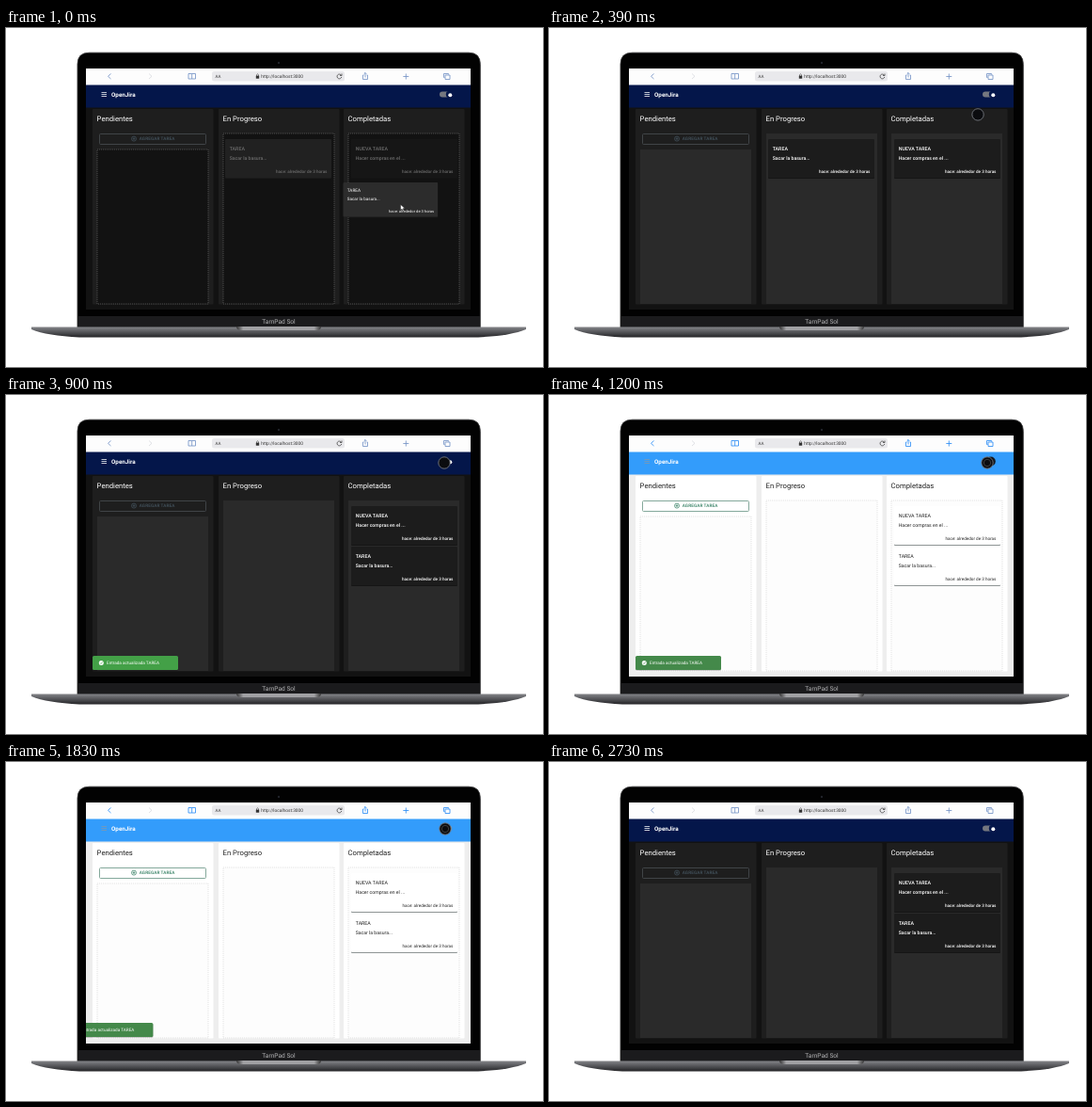
Recreate the animation shown at these times as an HTML page. Size 571x360 px, loop 3.66 s.

```html
<!DOCTYPE html>
<html lang="es">
<head>
<meta charset="utf-8">
<title>Tablero de tareas</title>
<style>
html, body { margin: 0; height: 100%; overflow: hidden; background: #fff; }
svg { display: block; width: 100vw; height: 100vh; font-family: Roboto, sans-serif; text-rendering: geometricPrecision; }
#screen { --page: #121212; --paper: #1e1e1e; --list: #2a2a2a; --line: none; --card: #1c1c1c; --edge: #151515;
  --ink: #fff; --bar: #04164a; --icon: #7090c4; --btn: #455560; --btnLine: #45494c; --pill: #74777f; --ok: #43a047; }
#screen.light { --page: #eee; --paper: #fff; --list: #fdfdfd; --line: #d5d5d5; --card: #fff; --edge: #8e9595;
  --ink: #222; --bar: #339cfb; --icon: #2589f5; --btn: #2d7c5e; --btnLine: #769f90; --pill: #9aabb8; --ok: #44894a; }
#screen.drag { --list: #121212; --line: #686868; --card: #212121; --edge: #1a1a1a; }
.drag #shopping { --card: #161616; --edge: #141414; }
.drag .lists .card text { fill: #6c6c6c; }
.light .menu { stroke: #8298ac; }
.list { fill: var(--list); stroke: var(--line); stroke-width: .7; stroke-dasharray: 1 1; }
.icon { fill: none; stroke: var(--icon); stroke-width: .8; }
.card text { fill: var(--ink); font-weight: 500; }
.light .card text, #ghost text { font-weight: 400; }
</style>
</head>
<body>
<svg viewBox="0 0 571 360">
  <defs>
    <linearGradient id="metal" x2="0" y2="1">
      <stop stop-color="#85868a"/><stop offset=".3" stop-color="#66676b"/><stop offset="1" stop-color="#242427"/>
    </linearGradient>
    <linearGradient id="notch">
      <stop stop-color="#333"/><stop offset=".08" stop-color="#a0a0a3"/>
      <stop offset=".92" stop-color="#a0a0a3"/><stop offset="1" stop-color="#333"/>
    </linearGradient>
    <clipPath id="view"><path d="M85 43H494V299H85Z"/></clipPath>
  </defs>

  <path d="M76 318V38.500Q76 26.200 88.500 26.200H492Q504.300 26.200 504.300 38.500V318Z" fill="#020202" stroke="#3a3a3c" stroke-width=".9"/>
  <circle cx="290" cy="37" r="1.200" fill="#20232b"/>
  <path d="M76.500 306H504V318H76.500Z" fill="#1b1b1d"/>
  <text x="290" y="314" font-size="6.600" fill="#b4b4b6" text-anchor="middle">TarnPad Sol</text>
  <path d="M27 317.500H553V320Q536 327 502 328.400H78Q44 327 27 320Z" fill="url(#metal)"/>
  <path d="M245 317H335Q335 321 330 321H250Q245 321 245 317Z" fill="url(#notch)"/>

  <g id="screen" clip-path="url(#view)">
    <path d="M85 43H494V299H85Z" fill="var(--page)"/>
    <path d="M85 43H494V61H85Z" fill="#fdfdfd"/>
    <rect x="219" y="46" width="141" height="10.500" rx="2.500" fill="#e9e9ec"/>
    <path class="icon" d="M111.500 48.500L108.500 51.300L111.500 54M194 48.500H197.700V54H194ZM197.700 48.500H201.500V54H197.700M380.500 50H379.500V54.500H384.500V50H383.500M382 52.500V47.500M380.700 48.800L382 47.500L383.300 48.800M425.300 48.500V54.500M422.300 51.500H428.300M466.500 52.500H465.500V48.500H470.500V49.500M467 50H472V54.500H467Z"/>
    <path d="M152 48.500L155 51.300L152 54" fill="none" stroke="#d4d6da" stroke-width=".7"/>
    <g fill="#333">
      <text x="222.500" y="53" font-size="4.500">AA</text>
      <path d="M265.800 50.700H269.200V53.700H265.800Z"/>
      <path d="M266.500 51V49.700Q267.500 48 268.500 49.700V51" fill="none" stroke="#333" stroke-width=".6"/>
      <text x="271.300" y="53.300" font-size="4.800">http://localhost:3000</text>
    </g>
    <path d="M356.500 50.200A2.400 2.400 0 1 0 356.800 52M357 48.500V50.500H355" fill="none" stroke="#333" stroke-width=".7"/>

    <path d="M85 60.500H494V84.500H85Z" fill="var(--bar)"/>
    <path class="menu" d="M101.500 68.500H107M101.500 70.500H107M101.500 72.500H107" stroke="#fff" stroke-width=".75"/>
    <text x="112" y="72.600" font-size="6.300" font-weight="700" fill="#fff">OpenJira</text>
    <rect x="461" y="67.500" width="13" height="6" rx="3" fill="var(--pill)"/>
    <g id="thumb"></g>

    <g class="lists" id="board"></g>
    <g id="toast">
      <rect x="92" y="277.800" width="91" height="15" rx="1.500" fill="#000" opacity=".25"/>
      <rect x="92" y="277" width="91" height="15" rx="1.500" fill="var(--ok)"/>
      <circle cx="101.300" cy="284.500" r="2.500" fill="#fff"/>
      <path d="M100 284.500L101 285.500L102.700 283.500" fill="none" stroke="var(--ok)" stroke-width=".7"/>
      <text x="107" y="286.200" font-size="4.650" fill="#fff">Entrada actualizada TAREA</text>
    </g>
    <g id="ghost"></g>
    <path id="arrow" d="M0 0L0 6L1.500 4.700L2.600 7L3.600 6.500L2.600 4.300L4.500 4.200Z" fill="#fff" stroke="#111" stroke-width=".4"/>
    <g id="dot">
      <circle r="6.200" fill="#0b0c0f" stroke="#777a80" stroke-width=".9"/>
      <circle id="ring" r="3.700" fill="none" stroke="#444" stroke-width=".9"/>
    </g>
  </g>
</svg>
<script>
const LOOP = 3660, DROP = 150, SAVED = 480, LIGHT = 1080, TOAST_OUT = 1765, DARK = 2010;
const $ = id => document.getElementById(id);
const clamp = v => Math.min(1, Math.max(0, v));
const show = (el, on) => el.style.display = on ? '' : 'none';
const move = (el, x, y, extra = '') => el.setAttribute('transform', `translate(${x} ${y}) ${extra}`);

const card = (id, title, body) => `<g class="card" id="${id}">
  <rect y="1" width="113" height="41" rx="1" fill="var(--edge)"/>
  <rect width="113" height="41" rx="1" fill="var(--card)"/>
  <text x="4.700" y="11.800" font-size="5.300">${title}</text>
  <text x="4.700" y="22" font-size="5.150">${body}</text>
  <text x="108.500" y="36.300" font-size="4.600" text-anchor="end">hace: alrededor de 3 horas</text></g>`;

const column = (x, title, top) => `<rect x="${x}" y="86" width="128.500" height="207.500" rx="1" fill="var(--paper)"/>
  <text x="${x + 4.6}" y="99" font-size="7.700" fill="var(--ink)">${title}</text>
  <rect class="list" x="${x + 5}" y="${top}" width="118" height="${293 - top}"/>`;

$('board').innerHTML = column(92, 'Pendientes', 129) + column(226, 'En Progreso', 112) + column(359, 'Completadas', 112) +
  `<rect x="99.500" y="112.500" width="113" height="11" rx="1" fill="none" stroke="var(--btnLine)" stroke-width=".9"/>
  <g fill="none" stroke="var(--btn)" stroke-width=".7"><circle cx="136" cy="117.600" r="2.500"/>
  <path d="M136 116.200V119M134.600 117.600H137.400"/></g>
  <text x="141.700" y="119.300" font-size="4.700" font-weight="500" letter-spacing=".1" fill="var(--btn)">AGREGAR TAREA</text>` +
  card('shopping', 'NUEVA TAREA', 'Hacer compras en el ...') + card('trash', 'TAREA', 'Sacar la basura...');
$('ghost').innerHTML = '<g style="--card:#2c2c2c">' + card('held', 'TAREA', 'Sacar la basura...') + '</g>';
move($('shopping'), 367, 118);

// Pointer stops: time, x, y
const stops = [[0, 419.5, 187.5], [DROP, 425, 174], [390, 456, 92], [600, 466, 73], [900, 466, 72],
  [1200, 466, 72], [1830, 467, 71], [2160, 468, 71], [LOOP, 468, 71]];

function pointer(t) {
  const i = stops.findIndex(s => s[0] > t), [t0, x0, y0] = stops[i - 1], [t1, x1, y1] = stops[i];
  const k = (t - t0) / (t1 - t0);
  return [x0 + (x1 - x0) * k, y0 + (y1 - y0) * k];
}

function draw(t) {
  const dragging = t < DROP, light = t >= LIGHT && t < DARK, saved = t >= SAVED;
  const [x, y] = pointer(t);
  $('screen').setAttribute('class', dragging ? 'drag' : light ? 'light' : '');
  move($('trash'), saved ? 367 : 233, saved ? 161 : 118);

  show($('ghost'), dragging);
  move($('ghost'), x - 61, y - 23.5, 'scale(.89)');
  show($('arrow'), dragging);
  move($('arrow'), x, y);

  show($('dot'), !dragging && t < 2730);
  move($('dot'), x, y);
  $('dot').setAttribute('opacity', (t < DARK ? 1 : .75) * (1 - clamp((t - 2550) / 180)));
  show($('ring'), t > LIGHT);

  const slide = clamp((t - LIGHT) / 400);
  $('thumb').innerHTML = light
    ? `<circle cx="${471 - 4 * slide}" cy="70.500" r="5" fill="#15181d"/>`
    : '<circle cx="471.500" cy="70.500" r="3.700" fill="#04164a"/><circle cx="472.300" cy="71.300" r="2" fill="#fff"/>';

  const enter = 1 - (1 - clamp((t - SAVED) / 225)) ** 3;
  const p = clamp((t - TOAST_OUT) / 195), leave = p * p * (3 - 2 * p);
  show($('toast'), saved && p < 1);
  move($('toast'), -100 * (1 - enter + leave), 0);
}

const start = performance.now();
function tick() {
  draw((performance.now() - start) % LOOP);
  requestAnimationFrame(tick);
}
tick();
</script>
</body>
</html>
```
